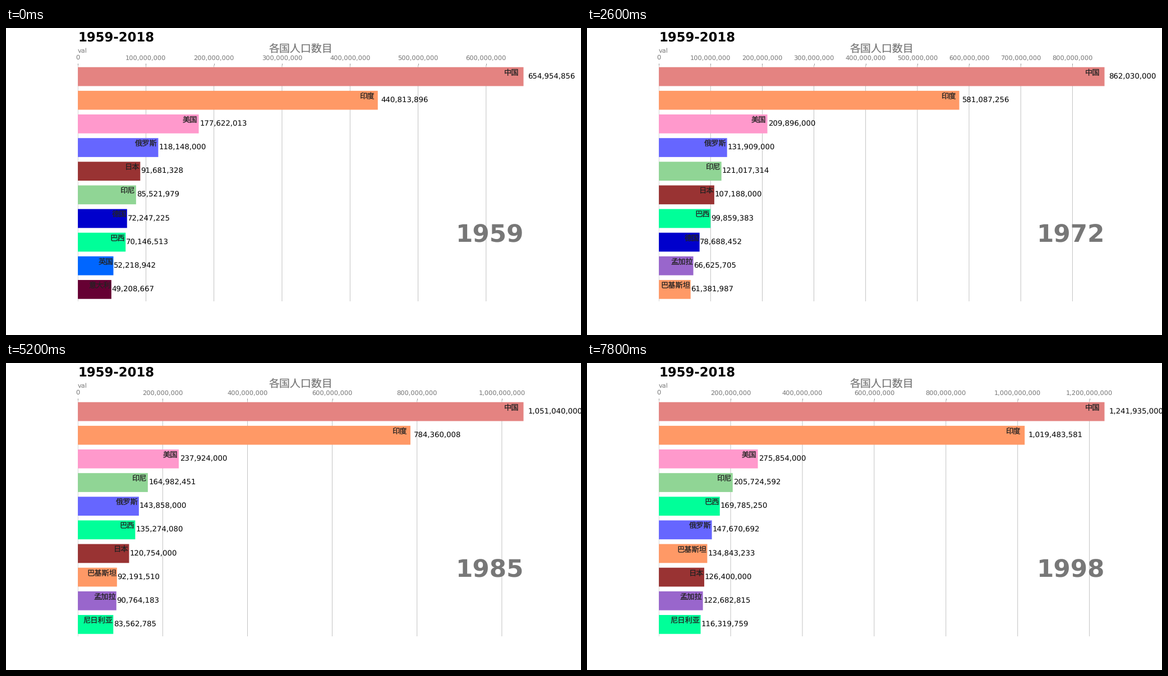
These frames come from a looping animation (1025x547 px, 8 s). A matplotlib script:

```python
import numpy as np
import matplotlib.pyplot as plt
from matplotlib.animation import FuncAnimation

W, H = 1025, 547
DPI = W / 15
FIRST, COUNT, STEP_MS = 1959, 40, 200
BARS = 10
GREY = "#777777"
CJK = "Noto Sans CJK JP"
plt.rcParams["text.hinting"] = "no_hinting"

# Bar colour, then population in millions at the key years;
# a country that drops out of the ranking has fewer keys.
KEY_YEARS = np.array([1959, 1967, 1972, 1985, 1998])
COUNTRIES = {
    "中国": ("#e48381", 654.954856, 754.55, 862.03, 1051.04, 1241.935),
    "印度": ("#ff9966", 440.813896, 520.400576, 581.087256, 784.360008, 1019.483581),
    "美国": ("#ff99cc", 177.622013, 198.712, 209.896, 237.924, 275.854),
    "俄罗斯": ("#6666ff", 118.148, 128.196, 131.909, 143.858, 147.670692),
    "日本": ("#993333", 91.681328, 100.725, 107.188, 120.754, 126.4),
    "印尼": ("#90d595", 85.521979, 105.865571, 121.017314, 164.982451, 205.724592),
    "德国": ("#0000cc", 72.247225, 76.951336, 78.688452, 77.684873),
    "巴西": ("#00ff99", 70.146513, 88.035814, 99.859383, 135.27408, 169.78525),
    "英国": ("#0066ff", 52.218942, 54.9436, 56.086065),
    "意大利": ("#660033", 49.208667, 52.667098),
    "孟加拉": ("#9966cc", 46.693518, 59.034249, 66.625705, 90.764183, 122.682815),
    "巴基斯坦": ("#ff9966", 43.871452, 53.642317, 61.381987, 92.19151, 134.843233),
    "尼日利亚": ("#00ff99", 44.237164, 52.257413, 58.66572, 83.562785, 116.319759),
}


def population(keys, year):
    """Cubic Hermite curve through the keys; 0 after the last one."""
    t, v = KEY_YEARS[:len(keys)], np.array(keys)
    if year > t[-1]:
        return 0
    slope = np.gradient(v, t)
    i = min(np.searchsorted(t, year, side="right"), len(t) - 1) - 1
    h = t[i + 1] - t[i]
    s = (year - t[i]) / h
    millions = (v[i] * (1 + 2 * s) * (1 - s) ** 2
                + h * slope[i] * s * (1 - s) ** 2
                + v[i + 1] * s * s * (3 - 2 * s)
                + h * slope[i + 1] * s * s * (s - 1))
    return round(millions * 1e6)


def ranking(year):
    """(value, name, colour) of the largest countries, smallest first."""
    rows = [(population(keys, year), name, color)
            for name, (color, *keys) in COUNTRIES.items()]
    return sorted(rows)[-BARS:]


fig, ax = plt.subplots(figsize=(15, (H + 0.01) / DPI), dpi=DPI)
fig.subplots_adjust(left=0.125, right=0.9, bottom=0.11, top=0.88)


def label(x, y, text, **style):
    ax.text(x, y, text, transform=ax.transAxes, **style)


def draw(index):
    year = FIRST + index
    ax.clear()
    for i, (value, name, color) in enumerate(ranking(year)):
        ax.barh(i, value, height=0.8, color=color, snap=False)
        ax.text(value * 0.99, i, name, size=14, family=CJK, color="#222222",
                ha="right", va="bottom")
        ax.text(value * 1.01, i, f"{value:,}", size=14, ha="left", va="center")

    label(1, 0.25, str(year), size=46, weight=800, color=GREY, ha="right")
    label(0, 1.052, "val", size=12, color=GREY)
    label(0, 1.1, "1959-2018", size=24, weight=600)
    label(0.5, 1.056, "各国人口数目", size=20, family=CJK, color=GREY, ha="center")

    ax.xaxis.set_major_formatter("{x:,.0f}")
    ax.xaxis.set_ticks_position("top")
    ax.tick_params(axis="x", colors=GREY, labelsize=12, pad=4)
    ax.set_yticks([])
    ax.margins(0, 0.01)
    ax.grid(which="major", axis="x", linestyle="-", snap=False)
    ax.set_axisbelow(True)
    ax.set_frame_on(False)
    return []


anim = FuncAnimation(fig, draw, frames=COUNT, interval=STEP_MS,
                     repeat=True, repeat_delay=0)
plt.show()
```
